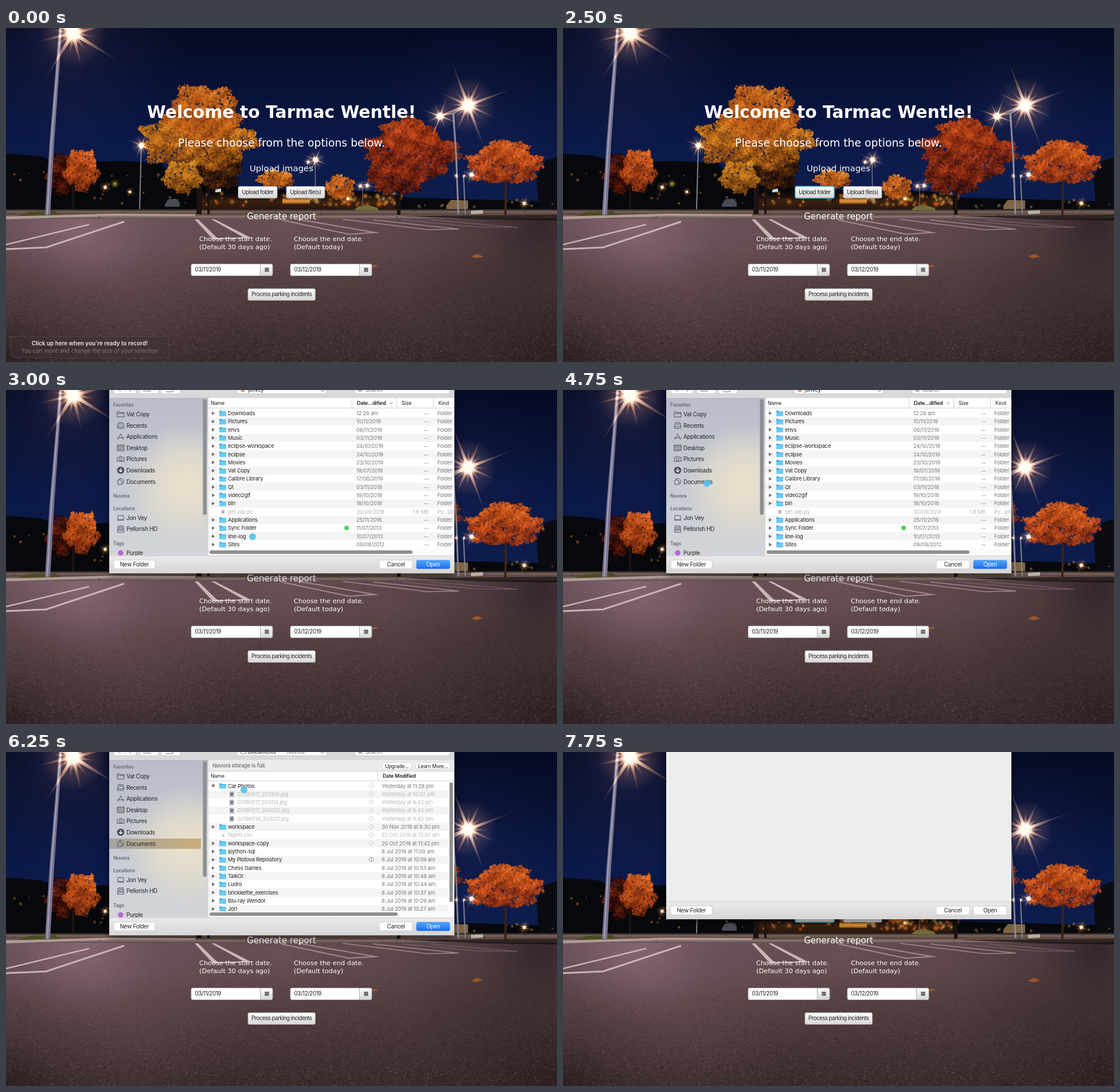
Animation, 961 px wide and 583 px high, one loop 8 s. Source, as an HTML page with a canvas:

```html
<!DOCTYPE html>
<html lang="en">
<head>
<meta charset="utf-8">
<title>Parking lot report</title>
<style>
html, body { margin: 0; width: 961px; height: 583px; overflow: hidden; background: #0a1230; }
canvas, #ui { position: absolute; left: 0; top: 0; }
#ui { font-family: Inter, sans-serif; font-size: 9.4px; letter-spacing: -.25px; fill: #222; }
.home { font-family: "DejaVu Sans", sans-serif; letter-spacing: 0; fill: #fff; }
.fx { font-size: 9.7px; letter-spacing: -.52px; }
.date { font-size: 9.7px; letter-spacing: -.35px; }
.mid { text-anchor: middle; }
.end { text-anchor: end; }
.bold { font-weight: 600; }
.grey { fill: #7b7b7b; }
.dim { fill: #b9b9b9; }
.line { fill: none; stroke: #4c5058; }
</style>
</head>
<body>
<canvas id="photo" width="961" height="583"></canvas>
<svg id="ui" width="961" height="583"></svg>
<script>
const W = 961, H = 583;
const c = document.getElementById('photo').getContext('2d');

let seed = 7;
const rnd = () => (seed = (seed * 16807) % 2147483647) / 2147483647;
const pick = a => a[Math.floor(rnd() * a.length)];

// ---------- night car park ----------
function area(x, y, w, h, stops) {
  const g = c.createLinearGradient(0, y, 0, y + h);
  stops.forEach((s, i) => g.addColorStop(i / (stops.length - 1), s));
  c.fillStyle = g;
  c.fillRect(x, y, w, h);
}
function glow(x, y, r, rgb, a) {
  const g = c.createRadialGradient(x, y, 0, x, y, r);
  g.addColorStop(0, `rgba(${rgb},${a})`);
  g.addColorStop(.4, `rgba(${rgb},${a * .35})`);
  g.addColorStop(1, `rgba(${rgb},0)`);
  c.fillStyle = g;
  c.fillRect(x - r, y - r, 2 * r, 2 * r);
}
function poly(color, ...pts) {
  c.fillStyle = color;
  c.beginPath();
  for (let i = 0; i < pts.length; i += 2) c.lineTo(pts[i], pts[i + 1]);
  c.fill();
}
function stroke(color, width, ...pts) {
  c.strokeStyle = color;
  c.lineWidth = width;
  c.beginPath();
  for (let i = 0; i < pts.length; i += 2) c.lineTo(pts[i], pts[i + 1]);
  c.stroke();
}
// Leaves lit in soft clumps; `shade` darkens the lower part
function crown(x, y, rx, ry, hue, light, shade) {
  const n = rx * ry * .85;
  for (let i = 0; i < n; i++) {
    const a = rnd() * 6.283;
    const r = Math.sqrt(rnd()) * (.9 + .1 * Math.sin(a * 5 + x) + .07 * Math.sin(a * 11) + .1 * rnd());
    const px = x + r * rx * Math.cos(a), py = y + r * ry * Math.sin(a);
    const clump = Math.sin(px / 8 + Math.sin(py / 9)) * Math.sin(py / 6.5 + px / 17);
    const l = light + clump * 7 + (rnd() - .5) * 18 - shade * (py - y) / ry;
    c.fillStyle = `hsla(${hue + l * .25 - 8},76%,${Math.max(6, l)}%,.8)`;
    c.beginPath();
    c.ellipse(px, py, 1.2 + rnd() * 2.2, .9 + rnd() * 1.3, rnd() * 3, 0, 7);
    c.fill();
  }
}
function star(x, y, r, tilt) {
  c.globalCompositeOperation = 'lighter';
  glow(x, y, r * .55, '235,150,70', .55);
  for (let i = 0; i < 16; i++) {
    const a = tilt + i * Math.PI / 8, len = r * (i % 2 ? .4 : i % 4 ? .65 : 1);
    const g = c.createRadialGradient(x, y, 0, x, y, len);
    g.addColorStop(0, 'rgba(255,235,190,.9)');
    g.addColorStop(.4, 'rgba(205,140,75,.4)');
    g.addColorStop(1, 'rgba(120,75,50,0)');
    const w = r * .035, dx = Math.sin(a) * w, dy = Math.cos(a) * w;
    poly(g, x + dx, y - dy, x + len * Math.cos(a), y + len * Math.sin(a), x - dx, y + dy);
  }
  c.globalCompositeOperation = 'source-over';
  glow(x, y, r * .2, '255,252,235', 1);
  glow(x, y, r * .15, '255,255,245', 1);
}

function drawGround() {
  c.save();
  c.beginPath();
  c.rect(0, 333, W, H);
  c.clip();
  area(0, 333, W, H - 333, ['#5f484d', '#5c464a', '#523e40', '#4a3838', '#423132', '#392a2b']);
  glow(130, 345, 330, '200,150,175', .36);
  glow(480, 345, 200, '150,115,120', .2);
  glow(930, 345, 260, '15,8,10', .5);
  glow(0, 583, 240, '15,8,10', .4);
  glow(W, 583, 300, '15,8,10', .3);
  for (let i = 0; i < 11000; i++) {
    const y = 336 + rnd() * 247, s = .5 + (y - 330) / 190;
    c.fillStyle = rnd() < .5 ? 'rgba(15,8,10,.18)' : 'rgba(215,180,175,.11)';
    c.fillRect(rnd() * W, y, s * 1.5, s);
  }
  c.restore();
}

function drawPhoto() {
  area(0, 0, W, 320, ['#050a24', '#071030', '#091642', '#0c1b4c', '#0d1d4c']);
  glow(110, 15, 200, '90,75,120', .3);
  glow(800, 140, 150, '50,50,95', .3);

  // tree line and distant lights
  poly('#07080c', 0, 219, 60, 224, 90, 235, 200, 232, 270, 236, 300, 270, 420, 278, 500, 283, 640, 285,
    700, 296, W, 303, W, 322, 0, 322);
  poly('#0b0c12', 925, 260, 940, 232, W, 225, W, 322, 930, 322);
  area(340, 288, 340, 30, ['rgba(60,30,12,0)', '#3a200f', '#24150f']);
  area(482, 298, 48, 9, ['#a8621d', '#e09a3c', '#7d4415']);
  for (let i = 0; i < 90; i++) {
    const x = 350 + rnd() * 340, y = 288 + rnd() * 22;
    glow(x, y, 2 + rnd() * 5, pick(['255,150,50', '255,190,90', '240,110,30']), .8);
  }
  for (let i = 0; i < 22; i++) glow(rnd() * 330, 250 + rnd() * 58, 1.5 + rnd() * 2.5, '255,160,60', .8);
  for (let i = 0; i < 14; i++) glow(720 + rnd() * 240, 294 + rnd() * 20, 1.5 + rnd() * 2.5, '255,190,110', .7);
  glow(190, 272, 8, '230,210,50', .9);
  poly('#4a4c55', 277, 308, 283, 299, 296, 298, 303, 304, 303, 312, 277, 312);
  poly('#cfd6da', 365, 282, 375, 280, 375, 286, 365, 287);
  poly('#7e6545', 768, 310, 776, 300, 806, 301, 806, 318, 768, 320);

  // kerb and asphalt
  area(0, 316, W, 18, ['#1d1616', '#78635b', '#55443f', '#8a7672', '#4f3f40']);
  drawGround();
  poly('#4b4b23', 20, 328, 40, 321, 85, 320, 100, 328);
  for (let i = 0; i < 80; i++) {
    c.fillStyle = pick(['#9a5a22', '#3a2c28']);
    c.fillRect(rnd() * W, 319 + rnd() * 12, 3, 1);
  }
  poly('#b09a98', 0, 329, 180, 324, 330, 325, 330, 328, 180, 328, 0, 334);
  poly('rgba(20,14,14,.75)', 690, 328, W, 326, W, 336, 830, 334);
  poly('#6f6c3a', 607, 318, 615, 311, 632, 309, 648, 314, 650, 319);
  poly('#b9b0a5', 811, 319, 832, 318, 832, 324, 811, 325);
  poly('#98572a', 811, 399, 822, 394, 832, 399, 820, 402);
  poly('#98572a', 638, 414, 645, 413, 649, 416, 640, 418);

  // bay markings
  const paint = '#c9b4b8', faded = 'rgba(190,165,165,.7)';
  stroke(paint, 2.4, 0, 378, 145, 343);
  stroke(paint, 3, 0, 386, 70, 383, 206, 338);
  poly(paint, 329, 334, 335, 334, 370, 368, 361, 369);
  poly(paint, 358, 334, 364, 334, 427, 366, 417, 367);
  stroke(paint, 2, 362, 368, 424, 366);
  stroke(faded, 2, 480, 335, 598, 360, 644, 357, 510, 334);
  stroke(faded, 1.5, 588, 334, 735, 352, 790, 351, 640, 335);
  stroke('rgba(170,145,150,.5)', 1.2, 690, 335, 820, 347, 893, 348, 740, 335);

  // trees
  const trunk = '#1d1310';
  poly(trunk, 333, 240, 342, 240, 341, 325, 332, 325);
  stroke(trunk, 4, 338, 265, 353, 235, 353, 325);
  crown(374, 246, 38, 36, 28, 15, 5);
  crown(335, 198, 102, 48, 28, 39, 10);
  crown(345, 150, 66, 51, 23, 41, 3);
  crown(308, 260, 34, 28, 30, 38, 10);
  stroke(trunk, 6, 686, 270, 685, 326);
  crown(706, 220, 84, 46, 13, 30, 8);
  crown(700, 186, 48, 30, 14, 35, 4);
  crown(682, 264, 50, 26, 13, 25, 8);
  stroke(trunk, 4, 117, 270, 117, 316);
  crown(100, 254, 28, 36, 14, 15, 4);
  crown(132, 248, 30, 36, 17, 38, 9);
  stroke('#3a2418', 4, 872, 260, 871, 327);
  crown(870, 240, 67, 32, 15, 39, 8);
  crown(872, 216, 44, 20, 17, 42, 4);
  crown(470, 264, 32, 16, 24, 41, 9);
  crown(582, 278, 25, 21, 22, 42, 8);
  stroke(trunk, 2, 470, 275, 470, 306);

  // lamp posts
  poly('#77738f', 92.5, 0, 98, 0, 84, 200, 77, 326, 68, 326, 76, 200);
  poly('#aaa2b8', 94, 0, 96, 0, 80, 200, 73, 326, 71, 326, 78, 200);
  stroke('#8c8b9d', 3, 780, 148, 785, 220, 789, 325);
  stroke('#77788c', 2, 757, 153, 781, 149, 806, 136);
  stroke('#83838f', 2, 236, 206, 233, 316);
  stroke('#777785', 1.5, 539, 232, 540, 306);
  stroke('#83838f', 2, 798, 258, 801, 325);
  stroke('#60606c', 1.5, 622, 277, 622, 312);
  star(117, 9, 105, .55);
  star(806, 135, 90, -.36);
  star(757, 154, 44, .35);
  star(236, 205, 34, .4);
  star(540, 230, 32, .4);
  star(527, 234, 16, .3);
  star(812, 256, 26, .4);
  star(785, 258, 11, .3);
  star(799, 258, 10, .3);
  star(618, 276, 18, .4);
  star(630, 275, 20, .2);
  star(904, 306, 20, .4);
  star(173, 278, 18, .4);
  star(216, 286, 14, .4);
  star(596, 298, 16, .4);
}

// ---------- interface ----------
const text = (x, y, s, cls = '', size = '') =>
  `<text x="${x}" y="${y}" class="${cls}"${size && ` font-size="${size}"`}>${s}</text>`;
const box = (x, y, w, h, fill, r = 0, more = '') =>
  `<rect x="${x}" y="${y}" width="${w}" height="${h}" fill="${fill}" rx="${r}" ${more}/>`;
const path = (d, fill, more = '') => `<path d="${d}" fill="${fill}" ${more}/>`;
const group = (id, s) => `<g id="${id}">${s}</g>`;
const tint = (fill, s) => `<g fill="${fill}">${s}</g>`;
const clip = (x, y, w, h, s) =>
  `<svg x="${x}" y="${y}" width="${w}" height="${h}" viewBox="${x} ${y} ${w} ${h}">${s}</svg>`;
const grad = (id, a, b, dir = 'x2="0" y2="1"') =>
  `<linearGradient id="${id}" ${dir}><stop stop-color="${a}"/><stop offset="1" stop-color="${b}"/></linearGradient>`;

const fxButton = (x, y, w, label) =>
  box(x, y, w, 20.5, 'url(#fx)', 2.5, 'stroke="#aaa" stroke-width=".8"') +
  text(x + w / 2, y + 13.2, label, 'mid fx');
const dateField = (x, date) =>
  box(x, 412, 142, 20.5, 'url(#fx)', 2.5, 'stroke="#aaa" stroke-width=".8"') +
  box(x + .5, 412.5, 120, 19.5, '#fff', 2) + path(`M${x + 120.5} 412v20.5`, 'none', 'stroke="#aaa"') +
  text(x + 6.5, 425, date, 'date') + box(x + 128.5, 418.5, 7, 7, '#555') +
  path(`M${x + 129} 420.5h6m-6 2h6m-4 -2v5m2 -5v5`, 'none', 'stroke="#aaa" stroke-width=".5"');

const home = `<g class="home">` +
  `<g font-weight="bold">${text(480.5, 157, 'Welcome to Tarmac Wentle!', 'mid', 29.8)}</g>` +
  text(480.5, 207, 'Please choose from the options below.', 'mid', 18.8) +
  text(480.5, 249.5, 'Upload images', 'mid', 14.9) +
  text(480.5, 334, 'Generate report', 'mid', 15) +
  text(337, 372, 'Choose the start date.', '', 11.35) + text(337, 386.3, '(Default 30 days ago)', '', 11.35) +
  text(502, 372, 'Choose the end date.', '', 11.35) + text(502, 386.3, '(Default today)', '', 11.35) + `</g>` +
  fxButton(405, 276.5, 68, 'Upload folder') + fxButton(489, 276.5, 67, 'Upload file(s)') +
  group('focus', box(404.8, 276.3, 68.4, 20.8, 'none', 3, 'stroke="#35a9cb" stroke-width="1.5"')) +
  dateField(323, '03/11/2019') + dateField(496, '03/12/2019') +
  fxButton(422, 455, 117.5, 'Process parking incidents');

const hint = box(8.5, 538.5, 276, 37, 'rgba(62,50,52,.5)', 3, 'stroke="rgba(130,115,115,.25)"') +
  `<g letter-spacing="0">` +
  tint('#f3e9e9', text(146, 554.3, "Click up here when you're ready to record!", 'mid bold', 9.9)) +
  tint('#857778', text(146, 567.3, 'You can move and change the size of your selection', 'mid', 9.7)) + `</g>`;

const folder = (x, y) =>
  path(`M${x} ${y - 4.5}h4l1.5 1.3h6.5v8h-12z`, '#48abe0') + box(x, y - 2, 12, 6.8, '#6bcaf7', .8);
const arrow = (y, open, fill = '#747474') =>
  path(open ? `M358 ${y - 2.5}h7l-3.5 5.5z` : `M359 ${y - 3.2}l5.5 3.2-5.5 3.2z`, fill);
const cloud = (y, fill) => path(`M634 ${y + 2}a2.5 2.5 0 0 1 0 -4a3.2 3.2 0 0 1 6 0a2.2 2.2 0 0 1 1 4M637.3 ${y - 1}v5m-1.5 -1.5l1.5 1.5 1.5 -1.5`,
  'none', `stroke="${fill}" stroke-width=".8"`);
const ROW = 14.32;
const stripes = (y, n, w) =>
  Array.from({length: n}, (_, i) => i % 2 ? box(353, y + i * ROW - 7.2, w, ROW, '#f4f4f4') : '').join('');

const homeFiles = `Downloads|12:26 am,Pictures|10/11/2019,envs|06/11/2019,Music|03/11/2019,eclipse-workspace|24/10/2019,
eclipse|24/10/2019,Movies|23/10/2019,Vat Copy|19/07/2019,Calibre Library|17/06/2019,Qt|03/11/2018,video2gif|19/10/2018,
bin|18/10/2018,get-pip.py|30/09/2018,Applications|25/11/2016,Sync Folder|11/07/2013,line-log|10/07/2013,Sites|09/08/2012`;
const docFiles = `Car Photos|Yesterday at 11:28 pm,20190517_203106.jpg|Yesterday at 10:32 pm,20190517_203114.jpg|Yesterday at 9:42 pm,
20190517_203052.jpg|Yesterday at 9:42 pm,20190514_203017.jpg|Yesterday at 9:42 pm,workspace|30 Nov 2019 at 8:30 pm,
flights.csv|22 Oct 2019 at 12:47 am,workspace-copy|20 Oct 2019 at 11:42 pm,ipython-sql|8 Jul 2019 at 11:00 am,
My Plotova Repository|8 Jul 2019 at 10:59 am,Chess Games|8 Jul 2019 at 10:53 am,TalkOr|8 Jul 2019 at 10:46 am,
Ludro|8 Jul 2019 at 10:44 am,brickkettle_exercises|8 Jul 2019 at 10:37 am,Blu-ray Wendor|8 Jul 2019 at 10:29 am,
Jorl|8 Jul 2019 at 10:27 am`;
const parse = s => s.split(',').map(r => r.trim().split('|'));

function homeRow([name, date], i) {
  const y = 40.6 + i * ROW, base = y + 3.3, file = name.endsWith('.py'), cls = file ? 'dim' : 'grey';
  return (file ? box(375.5, y - 3, 5.5, 6.5, '#c4b8ae', 1) : arrow(y) + folder(372, y)) +
    text(387, base, name, file ? 'dim' : '') + text(611, base, date, cls) +
    text(737, base, file ? '1.6 MB' : '--', cls + ' end') + text(752, base, file ? 'Py...ipt' : 'Folder', cls);
}
function docRow([name, date], i) {
  const y = 59.2 + i * ROW, base = y + 3.3, jpg = name.endsWith('.jpg'), file = jpg || name.endsWith('.csv');
  const icon = jpg ? box(390, y - 4.5, 7.5, 9.5, '#a9b2bb') + box(391.5, y - 2, 4.5, 4, '#66727d')
    : file ? box(375, y - 4.5, 7, 9, '#f2f2f2') + path(`M377 ${y + 2}l3 -3v3z`, '#999') : arrow(y, !i) + folder(372, y);
  return icon + text(jpg ? 403 : 387, base, name, file ? 'dim' : '') + text(655, base, date, file ? 'dim' : 'grey') +
    (i < 8 || i === 9 ? cloud(y, i === 9 ? '#666' : '#c4c4c4') : '');
}
const vline = (x, y, h) => path(`M${x} ${y}v${h}`, 'none', 'stroke="#d4d4d4"');
const hline = (x, y, w, color) => path(`M${x} ${y}h${w}`, 'none', `stroke="${color}"`);
const whiteButton = (x, y, w, h, label, size) =>
  box(x, y, w, h, '#fff', 3, 'stroke="#c2c2c2" stroke-width=".7"') + text(x + w / 2, y + h / 2 + 3.5, label, 'mid', size);

const homeTitle = text(422, 2.5, 'jonvey') + box(410, -3, 6, 6, '#d99050');
const homeTable = clip(353, 14, 429, 275,
  box(353, 14, 429, 275, '#fff') + stripes(40.6, 17, 429) +
  text(357, 26, 'Name', '', 9) + text(612, 26, 'Date...dified', 'bold', 9) + text(690, 26, 'Size', '', 9) + text(754, 26, 'Kind', '', 9) +
  path('M669.5 21.5l2.5 2.5 2.5 -2.5', 'none', 'stroke="#777"') +
  vline(603.5, 14, 17) + vline(681.5, 14, 17) + vline(745.5, 14, 17) + hline(353, 31.5, 429, '#d0d0d0') +
  parse(homeFiles).map(homeRow).join('') + '<circle cx="594" cy="240.8" r="4" fill="#4bd158"/>' +
  box(353, 278, 429, 11, '#fafafa') + box(355, 280, 354, 6, '#8f8f8f', 3));

const docTitle = box(409, -3, 10, 6, 'none', 1, 'stroke="#666" stroke-width=".8"') + text(422, 2.5, 'Documents') +
  text(490, 2.5, 'Nuvora', 'grey');
const docTable = clip(353, 14, 429, 275,
  box(353, 14, 429, 275, '#fff') + stripes(59.2, 16, 418) + parse(docFiles).map(docRow).join('') +
  group('picked', box(353, 52, 418, 14.3, '#0f62d9') + arrow(59.2, true, '#fff') + folder(372, 59.2) +
    tint('#fff', text(387, 62.5, 'Car Photos') + text(655, 62.5, 'Yesterday at 11:28 pm')) + cloud(59.2, '#5b94e6')) +
  box(353, 14, 429, 20, '#ececec') + text(360, 27, 'Nuvora storage is full.', 'bold grey') +
  whiteButton(656, 18, 51, 12, 'Upgrade...', 8.8) + whiteButton(714, 18, 61, 12, 'Learn More...', 8.8) +
  hline(353, 33.5, 429, '#d0d0d0') + text(357, 45, 'Name', '', 9) + text(657, 45, 'Date Modified', 'bold', 9) +
  vline(648.5, 34, 16) + hline(353, 50.5, 429, '#d0d0d0') +
  box(771, 51, 11, 230, '#fafafa') + box(773.5, 53, 6, 209, '#8f8f8f', 3) +
  box(353, 278, 429, 11, '#fafafa') + box(355, 280, 328, 6, '#8f8f8f', 3));

// Sidebar: label, centre line, icon path around its own origin
const places = [
  ['Vat Copy', 42.5, 'M-6 -4.5h4l1.5 1.5h6.5v7.5h-12zM-6 -1.5h12'],
  ['Recents', 62, 'M-4 -5h8l1.5 6v4h-11v-4zM-5 1.5h3l1 1.5h2l1 -1.5h3M-3 -2.5h6'],
  ['Applications', 81.5, 'M-5 5l5 -10 5 10M-6 2h12'],
  ['Desktop', 101, 'M-6 -5h12v10h-12zM-6 -3h12M-5 3h10M-6 0h12'],
  ['Pictures', 120.5, 'M-6 -3h3l1 -1.5h4l1 1.5h3v7h-12zM2.5 .5a2.5 2.5 0 1 0 -5 0a2.5 2.5 0 1 0 5 0'],
  ['Downloads', 140, ''],
  ['Documents', 160, 'M-5 -3h5l2 2v6h-7zM-2 -3v-2.5h4l3 3v5.5h-3'],
  ['Jon Vey', 223.2, 'M-5 -4h10v7h-10zM-6 4h12'],
  ['Pellorish HD', 242.7, 'M-4.5 -5.5h9l1 8v3h-11v-3zM-5.5 2h11M-3 -3h6v3h-6z'],
];
const headings = [['Favorites', 28.7], ['Nuvora', 187.7], ['Locations', 209.7], ['Tags', 270.7]];
const sidebar = clip(180, 15, 173, 274,
  box(180, 14, 172, 275, 'url(#side)') + box(180, 14, 172, 275, 'url(#warm)') +
  group('docsPlace', box(180, 151, 160, 18, 'url(#chosen)')) +
  tint('#686b73', headings.map(([s, y]) => text(187, y, s, 'bold', 8.5)).join('')) +
  places.map(([s, y, d]) => `<path class="line" transform="translate(200 ${y})" d="${d}"/>` + text(210, y + 3.5, s, '', 9.9)).join('') +
  '<circle cx="200" cy="140" r="6.3" fill="#4c5058"/>' + path('M200 136.5v6m-2.8 -2.6l2.8 2.8 2.8 -2.8', 'none', 'stroke="#fff" stroke-width="1.4"') +
  '<circle cx="200" cy="284.3" r="4.8" fill="#b469d4"/>' + text(210, 287.8, 'Purple', '', 9.9) +
  box(343.5, 16, 6.5, 202, '#8c8f96', 3.2) + vline(352.5, 14, 275));

const toolbar = box(180, 0, 602, 14.5, '#d9d9d9') + hline(180, 14.5, 602, '#b4b4b4') +
  [[188, 39], [233, 33], [270, 34], [403, 156], [609, 165]]
    .map(([x, w]) => box(x, -9, w, 15.5, '#fbfbfb', 3, 'stroke="#bdbdbd" stroke-width=".7"')).join('') +
  vline(207.5, 0, 6) + path('M200 -4l-3.5 3.5 3.5 3.5M215 -4l3.5 3.5 -3.5 3.5M239 2h14M279 3h12v-6M549 0l3 3 3 -3', 'none', 'stroke="#777"') +
  path('M619.5 1l2.5 2.5', 'none', 'stroke="#777"') + '<circle cx="617" cy="-1" r="3" class="line"/>' + text(627, 2.5, 'Search', 'grey');

const sheet = box(180, -40, 602, 360, '#ededed', 0, 'style="filter:drop-shadow(0 4px 6px rgba(0,0,0,.5))"') +
  box(180, 289, 602, 31, 'url(#foot)') + hline(180, 289.5, 602, '#cfcfcf') +
  whiteButton(188, 297, 72, 15, 'New Folder', 9.9) + whiteButton(651, 297, 58, 15, 'Cancel', 9.9) + whiteButton(716, 297, 58, 15, 'Open', 9.9) +
  group('content', toolbar + sidebar + group('homeTitle', homeTitle) + group('homeTable', homeTable) +
    group('docTitle', docTitle) + group('docTable', docTable) +
    box(715.7, 296.7, 58.6, 15.6, 'url(#blue)', 3) + tint('#fff', text(745, 308, 'Open', 'mid', 9.9)));

document.getElementById('ui').innerHTML =
  `<defs>${grad('fx', '#fdfdfd', '#d6d6d6')}${grad('side', '#b8bdca', '#d3d5da')}${grad('foot', '#ebebeb', '#d5d5d5')}
  ${grad('blue', '#55a5f9', '#176df3')}${grad('chosen', '#a4a3a3', '#c9ae79', '')}
  <radialGradient id="warm" gradientUnits="userSpaceOnUse" cx="315" cy="165" r="105"><stop stop-color="#ebe3cb"/>
  <stop offset=".5" stop-color="#e4decd" stop-opacity=".8"/><stop offset="1" stop-color="#e4decd" stop-opacity="0"/></radialGradient></defs>` +
  home + group('hint', hint) + group('sheet', sheet) +
  '<circle id="pointer" r="6" fill="#4fc0ee" fill-opacity=".88"/><circle id="ripple" fill="none" stroke="#6cc4ea"/>';

// ---------- timeline ----------
const LOOP = 8000, STEP = 250;
const moves = [
  [[500, 760, 400], [1250, 446, 300], [1500, 432, 293]],
  [[2750, 431, 285], [3000, 430, 256], [3750, 285, 176], [4750, 251, 163]],
  [[5750, 255, 172], [6250, 415, 66]],
  [[6750, 420, 64], [7250, 731, 312]],
];
const clicks = [[1750, 432, 293], [5000, 249, 179], [6500, 418, 60], [7500, 733, 307]];
const el = id => document.getElementById(id);
const show = (id, on) => { el(id).style.display = on ? '' : 'none'; };
const set = (id, attrs) => { for (const k in attrs) el(id).setAttribute(k, attrs[k]); };

function pointerAt(t) {
  for (const m of moves) for (let i = 1; i < m.length; i++) {
    const [a, x, y] = m[i - 1], [b, x2, y2] = m[i], k = (t - a) / (b - a);
    if (k >= 0 && k <= 1) return {cx: x + (x2 - x) * k, cy: y + (y2 - y) * k};
  }
}
function render(t) {
  const blank = t < 3000 || t >= 7750;
  show('focus', t >= 2000);
  set('hint', {opacity: Math.max(0, 1 - t / 750)});
  show('sheet', t >= 2750);
  set('sheet', {transform: `translate(0 ${blank ? -28 : 0})`});
  show('content', !blank);
  show('homeTitle', t < 5000);
  show('docTitle', t >= 5000);
  show('docsPlace', t >= 5000);
  show('homeTable', t < 5250);
  show('docTable', t >= 5250);
  show('picked', t >= 6750);

  const p = pointerAt(t);
  show('pointer', p);
  if (p) set('pointer', p);
  const hit = clicks.find(([a]) => t >= a && t <= a + 500 && t < 7750);
  show('ripple', hit);
  if (hit) {
    const age = (t - hit[0]) / STEP;
    set('ripple', {cx: hit[1], cy: hit[2], r: 5 + age, opacity: .75 - age * .28});
  }
}
function frame() {
  render(Math.floor(performance.now() % LOOP / STEP) * STEP);
  requestAnimationFrame(frame);
}
drawPhoto();
frame();
</script>
</body>
</html>
```
